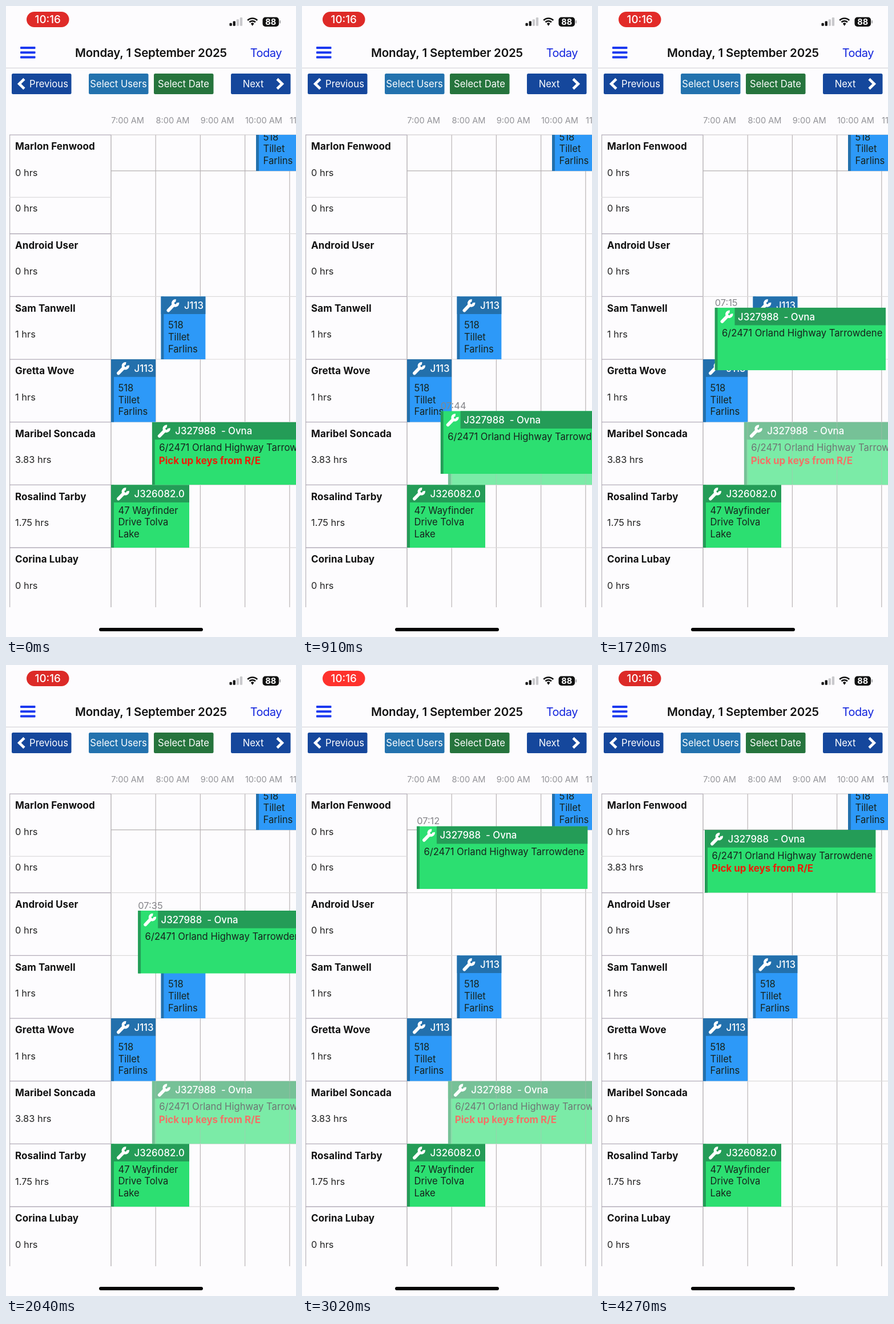
Write an HTML page with a canvas that moves like this. It is 508 px wide and 1102 px high and loops after 4290 ms.

```html
<!DOCTYPE html>
<html lang="en">
<head>
<meta charset="utf-8">
<title>Day planner</title>
<style>
  html, body { margin: 0; width: 100%; height: 100%; overflow: hidden; background: #fdfcfe; }
  canvas { display: block; width: 508px; height: 1102px; }
</style>
</head>
<body>
<canvas id="stage"></canvas>
<script>
const W = 508, H = 1102, LOOP = 4290;
const PICK_UP = 450, DROP = 3700;
const TOP = 225, BOTTOM = 1050, LEFT = 6, GRID = 184, HOUR = 78.2, ROW = 109.65;
const FAMILY = 'Inter, "Liberation Sans", sans-serif';
const PAPER = '#fdfcfe';
const BLUE = { dark: '#2370ac', light: '#2d99f8' };
const GREEN = { dark: '#249c57', light: '#2cdf71' };

const canvas = document.getElementById('stage');
const ctx = canvas.getContext('2d');
const ratio = window.devicePixelRatio || 1;
canvas.width = W * ratio;
canvas.height = H * ratio;

// Drag path: time, left edge, top edge
const path = [
  [600, 255.8, 726.5], [1280, 218.5, 655], [1720, 204.5, 527],
  [2380, 260, 347.5], [3020, 201, 281.5], [3500, 187, 285]
];

const people = [
  ['Marlon Fenwood', '0 hrs'], ['Android User', '0 hrs'], ['Sam Tanwell', '1 hrs'],
  ['Gretta Wove', '1 hrs'], ['Maribel Soncada', '3.83 hrs'],
  ['Rosalind Tarby', '1.75 hrs'], ['Corina Lubay', '0 hrs']
];
const street = ['518', 'Tillet', 'Farlins'];
const rowTop = i => i ? 397.7 + (i - 1) * ROW : TOP;

function rect(x, y, w, h, color, radius = 0) {
  ctx.fillStyle = color;
  ctx.beginPath();
  ctx.roundRect(x, y, w, h, radius);
  ctx.fill();
}

function text(str, x, y, size, color = '#111', weight = 400, spacing = 0, align = 'left') {
  ctx.font = `${weight} ${size}px ${FAMILY}`;
  ctx.letterSpacing = spacing + 'px';
  ctx.textAlign = align;
  ctx.fillStyle = color;
  ctx.fillText(str, x, y);
}

function stroke(points, width, color, cap = 'butt') {
  ctx.strokeStyle = color;
  ctx.lineWidth = width;
  ctx.lineCap = cap;
  ctx.beginPath();
  points.forEach(([x, y]) => ctx.lineTo(x, y));
  ctx.stroke();
}

function arc(x, y, r, from, to, width, color) {
  ctx.strokeStyle = color;
  ctx.lineWidth = width;
  ctx.lineCap = 'butt';
  ctx.beginPath();
  ctx.arc(x, y, r, from * Math.PI, to * Math.PI);
  ctx.stroke();
}

// Smooth curve through the path points that never overshoots
function along(t, axis) {
  const last = path.length - 1;
  if (t <= path[0][0]) return path[0][axis];
  if (t >= path[last][0]) return path[last][axis];
  const rate = i => (path[i + 1][axis] - path[i][axis]) / (path[i + 1][0] - path[i][0]);
  const slope = i => {
    if (i === 0 || i === last) return 0;
    const a = rate(i - 1), b = rate(i);
    return a * b <= 0 ? 0 : 2 * a * b / (a + b);
  };
  const i = path.findIndex(p => p[0] > t) - 1;
  const span = path[i + 1][0] - path[i][0];
  const u = (t - path[i][0]) / span, v = 1 - u;
  return path[i][axis] * (1 + 2 * u) * v * v + path[i + 1][axis] * (3 - 2 * u) * u * u
    + span * u * v * (slope(i) * v - slope(i + 1) * u);
}

function wrench(x, y) {
  stroke([[x + 13, y + 24.3], [x + 22, y + 15]], 5.8, '#fff', 'round');
  arc(x + 25.3, y + 11.6, 4.3, -0.06, 1.56, 4.8, '#fff');
}

function block({ x, y, w, h = ROW, color, job, lines, first = 44.5, note, lifted }) {
  ctx.save();
  ctx.beginPath();
  ctx.rect(x, y, w, h);
  ctx.clip();
  rect(x, y, w, h, color.light);
  rect(x, y, 5, h, color.dark);
  const start = lifted ? 35 : 0;
  rect(x + start, y, w - start, 30.7, color.dark);
  wrench(x, y);
  text(job, x + 40.5, y + 21.8, 16.8, '#fff', 500);
  lines.forEach((line, i) => text(line, x + 12.5, y + first + 6 + i * 20.6, 16.6, '#17231d'));
  if (note) text(note, x + 12, y + 73.2, 16.9, '#ee1c08', 700);
  ctx.restore();
}

function hourLines() {
  for (let i = 0; i < 5; i++) {
    rect(GRID + i * HOUR - 0.6, TOP, 1.2, BOTTOM - TOP, i ? '#bab5b6' : '#aaa5a8');
  }
}

// Fades a finished block as one layer, letting the grid show through
function veil({ x, y, w }) {
  ctx.save();
  ctx.beginPath();
  ctx.rect(x, y, w, ROW);
  ctx.clip();
  ctx.globalAlpha = 0.38;
  rect(x, y, w, ROW, PAPER);
  hourLines();
  ctx.restore();
}

function statusBar(t) {
  const glow = Math.max(0, Math.cos((t - 1330) / 1740 * 2 * Math.PI));
  const mix = (a, b) => Math.round(a + (b - a) * glow);
  rect(36, 10, 74.5, 27, `rgb(${mix(220, 255)},${mix(42, 50)},${mix(39, 45)})`, 13.5);
  text('10:16', 73.2, 30, 18.8, '#fff', 500, 0, 'center');
  for (let i = 0; i < 4; i++) {
    const h = 5 + i * 3.2;
    rect(391.5 + i * 6.1, 34.7 - h, 4.3, h, i < 2 ? '#111' : '#c9c9cc', 1.2);
  }
  [12, 7.4].forEach(r => arc(431.7, 33.5, r, -0.75, -0.25, 2.7, '#111'));
  ctx.fillStyle = '#111';
  ctx.beginPath();
  ctx.moveTo(431.7, 34.8);
  ctx.arc(431.7, 33.5, 4, -0.75 * Math.PI, -0.25 * Math.PI);
  ctx.fill();
  rect(449.5, 19.5, 28.5, 16.5, '#111', 5);
  rect(479, 25, 2, 5.5, '#a5a5a8', 1);
  text('88', 463.8, 33, 14.5, '#fff', 700, 0, 'center');
}

function toolbar() {
  [73, 81.3, 89.6].forEach(y => rect(25, y - 2, 26.5, 4, '#1a38f0', 1));
  text('Monday, 1 September 2025', 254, 88.7, 20.5, '#111', 600, -0.2, 'center');
  text('Today', 427.7, 88.7, 20, '#1224dd', 400, -0.5);
  rect(0, 107.8, W, 1.2, '#d6d6da');

  const button = (x, color) => rect(x, 118, 104.5, 36, color, 2.5);
  const label = (str, x) => text(str, x, 142, 16.6, '#fff', 400, 0, 'center');
  button(10, '#15479c');
  button(145, '#2372ae');
  button(259, '#26743d');
  button(394, '#15479c');
  label('Previous', 75);
  label('Select Users', 197);
  label('Select Date', 311);
  label('Next', 433);
  stroke([[32, 127.5], [23.2, 136], [32, 144.5]], 4.6, '#fff');
  stroke([[475, 127.5], [483.8, 136], [475, 144.5]], 4.6, '#fff');
}

function grid(moved) {
  for (let i = 0; i < 5; i++) {
    text(`${7 + i}:00 AM`, GRID + i * HOUR + 0.3, 205, 14.6, '#929297');
  }
  hourLines();
  rect(LEFT, TOP, 1.2, BOTTOM - TOP, '#b9b6bb');
  rect(LEFT, TOP - 0.6, GRID - LEFT, 1.3, '#b3adb9');
  rect(GRID, TOP - 0.6, W - GRID, 1.2, '#c9c6c8');
  rect(GRID, 287.3, W - GRID, 1.2, '#b5b1b2');
  rect(LEFT, 333.5, GRID - LEFT, 1.2, '#dcdbdd');

  people.forEach(([name, hours], i) => {
    const y = rowTop(i);
    if (i) {
      rect(LEFT, y - 0.6, GRID - LEFT, 1.3, '#b3adb9');
      rect(GRID, y - 0.6, W - GRID, 1.2, '#dbdada');
    }
    text(name, 16, y + 26.3, 17, '#111', 700, 0.1);
    text(moved && i === 4 ? '0 hrs' : hours, 16, y + 71.6, 16.4, '#222');
  });
  text(moved ? '3.83 hrs' : '0 hrs', 16, 359.3, 16.4, '#222');
}

function jobs(t, moved) {
  const visit = (x, y, w = 78.2) =>
    block({ x, y, w, color: BLUE, job: 'J113', lines: street, first: 50 });
  visit(438, 178.5, 100);
  visit(271.4, rowTop(2));
  visit(GRID, rowTop(3));
  block({
    x: GRID, y: rowTop(5), w: 137, color: GREEN, job: 'J326082.0',
    lines: ['47 Wayfinder', 'Drive Tolva', 'Lake']
  });

  const visitLong = {
    w: 299.5, color: GREEN, job: 'J327988\u00a0 - Ovna',
    lines: ['6/2471 Orland Highway Tarrowdene']
  };
  const note = 'Pick up keys from R/E';
  const home = { ...visitLong, x: 255.8, y: rowTop(4), note };
  if (moved) return block({ ...visitLong, x: 187, y: 288, note });
  block(home);
  if (t < PICK_UP) return;

  veil(home);
  const x = along(t, 1), y = along(t, 2);
  const minute = Math.floor((x - 184.5) / 78 * 60);
  text('07:' + String(minute).padStart(2, '0'), x + 0.2, y - 3.2, 16.4, '#85858a');
  block({ ...visitLong, x, y, lifted: true });
}

function draw(t) {
  const moved = t >= DROP;
  ctx.setTransform(ratio, 0, 0, ratio, 0, 0);
  rect(0, 0, W, H, PAPER);
  statusBar(t);
  toolbar();
  grid(moved);
  ctx.save();
  ctx.beginPath();
  ctx.rect(0, TOP, W, BOTTOM - TOP);
  ctx.clip();
  jobs(t, moved);
  ctx.restore();
  rect(163, 1086, 182, 6, '#050505', 3);
}

const begin = performance.now();
function frame() {
  draw((performance.now() - begin) % LOOP);
  requestAnimationFrame(frame);
}
frame();
</script>
</body>
</html>
```
